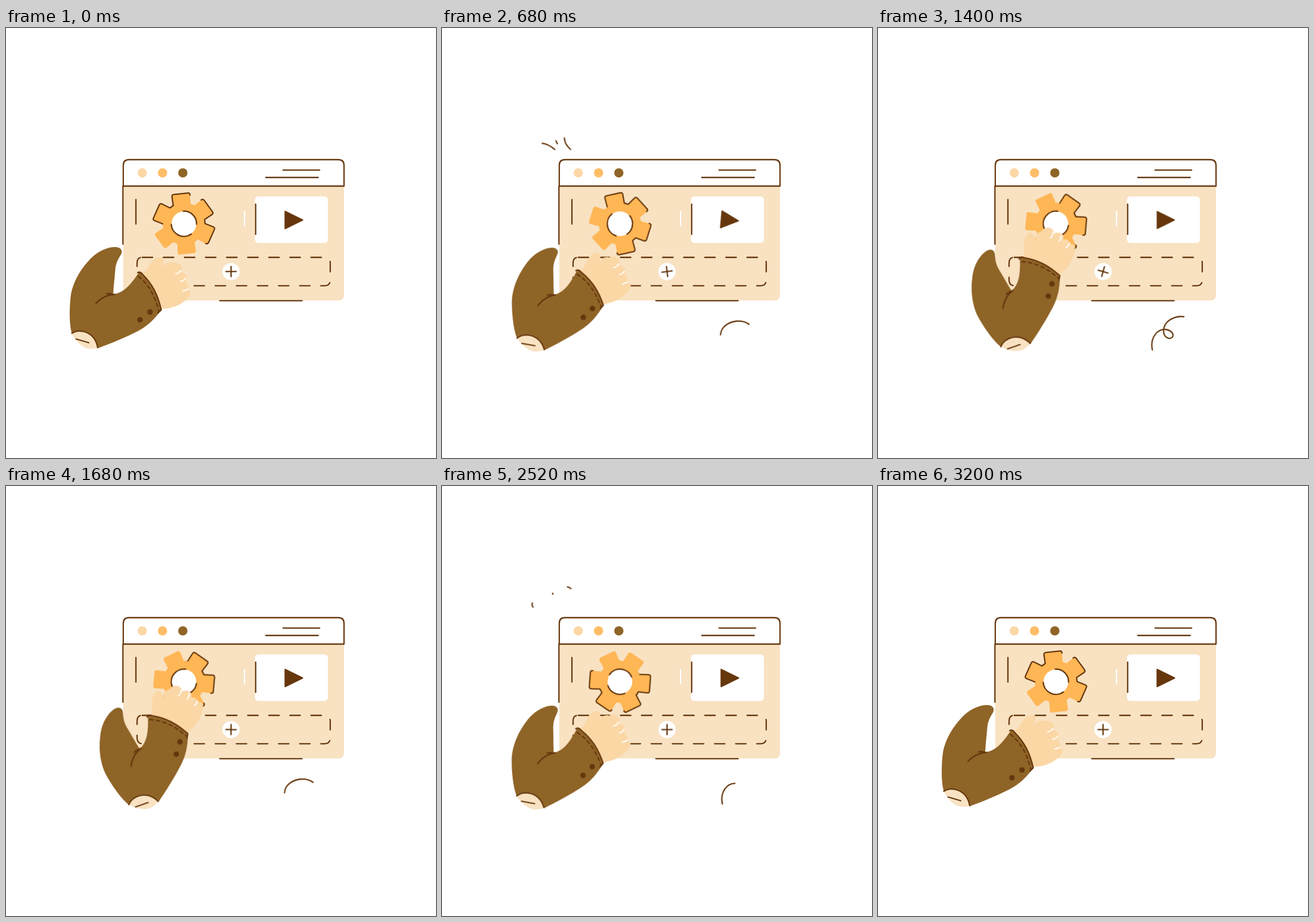
An HTML page for the animation above (3.28 s loop, 748 by 748 pixels).

```html
<!DOCTYPE html>
<html lang="en">
<head>
<meta charset="utf-8">
<title>Web page setup</title>
<style>
  html, body { margin: 0; width: 100%; height: 100%; overflow: hidden; background: #fff; }
  svg { display: block; width: 100vw; height: 100vh; }

  .line { fill: none; stroke: #66370d; stroke-width: 2.3; stroke-linecap: round; stroke-linejoin: round; }
  .white { fill: none; stroke: #fff; stroke-width: 2.2; stroke-linecap: round; }
  .dark { fill: #66370d; }
  .brown { fill: #8f6427; }
  .cream { fill: #f8e2c2; }
  .skin { fill: #fbd7a6; }
  .amber { fill: #ffb655; }

  #arm, #gear, #plus, #play, #marks, #marks path, #curl { animation: 3280ms linear infinite; }

  #arm { transform-origin: 200.5px 388.5px; animation-name: reach; animation-timing-function: cubic-bezier(.37, 0, .63, 1); }
  @keyframes reach {
    0%, 1.22% { transform: rotate(0deg); }
    12.8% { transform: rotate(-20deg); }
    25.61% { transform: rotate(0deg); }
    40.85%, 62.2% { transform: rotate(-35.6deg); }
    82.32%, 100% { transform: rotate(0deg); }
  }

  #gear { transform-origin: 309.5px 340.5px; animation-name: spin; }
  @keyframes spin {
    0%, 1.22% { transform: rotate(0deg); }
    38.11%, 70.73% { transform: rotate(101deg); }
    97.56%, 100% { transform: rotate(360deg); }
  }

  #plus { transform-origin: 391.5px 423.7px; animation-name: turn; animation-timing-function: cubic-bezier(.4, 0, .3, 1); }
  @keyframes turn {
    0%, 15.85% { transform: rotate(0deg); }
    54.88%, 100% { transform: rotate(-180deg); }
  }

  #play { transform-origin: 498.5px 334px; animation-name: nudge; animation-timing-function: ease-in-out; }
  @keyframes nudge {
    0%, 12.8% { transform: rotate(0deg) scale(1); }
    20.73% { transform: rotate(5deg) scale(.98); }
    27% { transform: rotate(0deg) scale(.93); }
    34.15% { transform: rotate(0deg) scale(.78); }
    45%, 100% { transform: rotate(0deg) scale(1); }
  }

  /* Strokes draw on, then wipe off from their start, while drifting. */
  #marks path, #curl { stroke-dasharray: 1 2; }
  #marks { animation-name: drift; }
  #marks path { animation-name: flick; }
  @keyframes drift {
    0%, 14.63% { transform: translate(2.9px, 4px); }
    39.02% { transform: translate(-2.1px, -3px); }
    39.03%, 54.27% { transform: translate(2.9px, 4px); }
    78.66%, 100% { transform: translate(-2.1px, -3px); }
  }
  @keyframes flick {
    0%, 14.62% { opacity: 0; stroke-dashoffset: 1; }
    14.63% { opacity: 1; stroke-dashoffset: 1; }
    39.02% { opacity: 1; stroke-dashoffset: -1; }
    39.03%, 54.26% { opacity: 0; stroke-dashoffset: 1; }
    54.27% { opacity: 1; stroke-dashoffset: 1; }
    78.66% { opacity: 1; stroke-dashoffset: -1; }
    78.67%, 100% { opacity: 0; stroke-dashoffset: 1; }
  }

  #curl { animation-name: curl; }
  @keyframes curl {
    0%, 1.21%, 25.62%, 31.7%, 56.11%, 73.16%, 97.57%, 100% {
      opacity: 0; stroke-dashoffset: 1; transform: translate(17.5px, -11.5px);
    }
    1.22%, 31.71%, 73.17% { opacity: 1; stroke-dashoffset: 1; transform: translate(17.5px, -11.5px); }
    25.61%, 56.1%, 97.56% { opacity: 1; stroke-dashoffset: -1; transform: translate(-17.5px, 11.5px); }
  }
</style>
</head>
<body>
<svg viewBox="0 0 748 748">
  <!-- Window -->
  <path class="cream" d="M204 275H588V464Q588 474 578 474H214Q204 474 204 464Z"/>
  <path class="line" fill="#fff" d="M204 275V239Q204 229 214 229H578Q588 229 588 239V275Z"/>
  <path class="line" d="M203.4 275V376M372 474.3H515M482 247.2H545.5M452 260H543M226 298.5V341"/>
  <circle class="skin" cx="237" cy="252" r="8"/>
  <circle fill="#ffbd66" cx="272.3" cy="252" r="8"/>
  <circle class="brown" cx="307.6" cy="252" r="8"/>
  <path class="white" d="M415 319V344"/>

  <rect x="433" y="293" width="127" height="81" rx="6" fill="#fff"/>
  <path class="line" d="M434.3 306.5V359"/>
  <path id="play" class="dark" stroke="#66370d" stroke-width="2" stroke-linejoin="round" d="M485.5 319V349L516 334Z"/>

  <path class="line" stroke-dasharray="18 18.7" d="M237 399H554Q564 399 564 409V438Q564 448.3 554 448.3H238Q228 448.3 228 438V409Q228 399 237 399"/>
  <circle cx="391.5" cy="423.7" r="15" fill="#fff"/>
  <path id="plus" class="line" stroke-width="2" d="M382.7 423.7H400.3M391.5 414.9V432.5"/>

  <g id="gear">
    <path id="cog" class="amber"/>
    <path id="rim" class="line"/>
    <circle cx="309.5" cy="340.5" r="21.5" fill="#fff"/>
    <path id="hub" class="line"/>
  </g>

  <g id="marks" class="line">
    <path pathLength="1" d="M194.5 209C186 202 176 197 168 198.500C160 200 156 208 160 213"/>
    <path pathLength="1" d="M199 199L194 189"/>
    <path pathLength="1" d="M222 209C214 202 210 193 211.500 186C213 178 219 175 226 181"/>
  </g>
  <path id="curl" class="line" pathLength="1" d="M475.500 561C471 540 484 524 499 525.500C509 527 514 534 510 539C505 544 495 539 495 528C495 511 512 504 523 503C532 502.500 540 505 544.500 508.500"/>

  <g id="arm">
    <path class="skin" d="M234 427C243 427 247 413 256 404C262 398 273 396 274 403C275 408 271 412 271 416C276 408 284 406 289 409C296 406 304 410 306 416C307 420 305 424 304 425C311 425 317 432 315 438C314 441 313 442 312 443C317 445 319 452 317 456C322 458 322 464 319 467C308 479 297 487 269 489Z"/>
    <path class="white" d="M295 427.500C299 427 302 425 304 422M304 440.500C308 440 311 438 313 435M307.500 457C311 457.500 314 456 316.500 454"/>
    <path class="cream" d="M114 531C119 541 129 553 140 557C147 558.500 154 558 160 556.500C158 543 148 528 134 526C125 525 119 527 114 531Z"/>
    <path class="brown" d="M114.500 531C110 516 110 490 112.500 467C116 440 134 412 154 395C169 383 187 379 196 382C201 384 203 389 200 394C195 402 191 409 190 421C189 436 187 449 186.500 463C204 461 216 448 231 425.500Q235 424 238 429C255 446 264 464 270 490C259 507 245 519 228 528C208 538 182 549 160 557C157 541 147 528 133 526.500C125 526 119 527 114.500 531Z"/>
    <path class="line" d="M114.500 531C130 521 155 530 159.500 556M122 541L144 547.500M156.500 479C165 470 175 464 189 463.500M175 462.500C179 461.500 183 462 187 463.500M229 425.500Q234 423 238 429C255 446 264 464 270 490C268 493 266 494 264 496"/>
    <path class="line" stroke-width="2" stroke-dasharray="6 5.500" d="M230.500 432C248 446 259 465 265.500 492"/>
    <circle class="dark" cx="250.500" cy="494" r="4.800"/>
    <circle class="dark" cx="233" cy="507.500" r="4.800"/>
  </g>
</svg>
<script>
  const cx = 309.5, cy = 340.5, rad = Math.PI / 180;
  const at = (r, deg) => `${(cx + r * Math.cos(deg * rad)).toFixed(2)} ${(cy + r * Math.sin(deg * rad)).toFixed(2)}`;

  // Point of tooth n: x across the tooth, y outwards.
  const point = (n, x, y) => at(Math.hypot(x, y), n * 60 - 156 + Math.atan2(x, y) / rad);
  const root = (n, side) => `L${point(n, side * 15.2, 33.5)}`;
  const tip = n =>
    `L${point(n, -15.8, 48.5)}Q${point(n, -16, 52.5)} ${point(n, -12, 52.5)}` +
    `L${point(n, 12, 52.5)}Q${point(n, 16, 52.5)} ${point(n, 15.8, 48.5)}`;
  const tooth = n => root(n, -1) + tip(n) + root(n, 1);
  const open = d => 'M' + d.slice(1);
  const arc = (from, to) => `M${at(22, from)}A22 22 0 0 1 ${at(22, to)}`;
  const draw = (id, d) => document.getElementById(id).setAttribute('d', d);

  draw('cog', open([0, 1, 2, 3, 4, 5].map(tooth).join('')) + 'Z');
  draw('rim', open(tooth(0) + root(1, -1) + tip(1)) + open(tip(2) + root(2, 1) + root(3, -1) + tip(3)));
  draw('hub', arc(-93, 2) + arc(54, 177));
</script>
</body>
</html>
```
